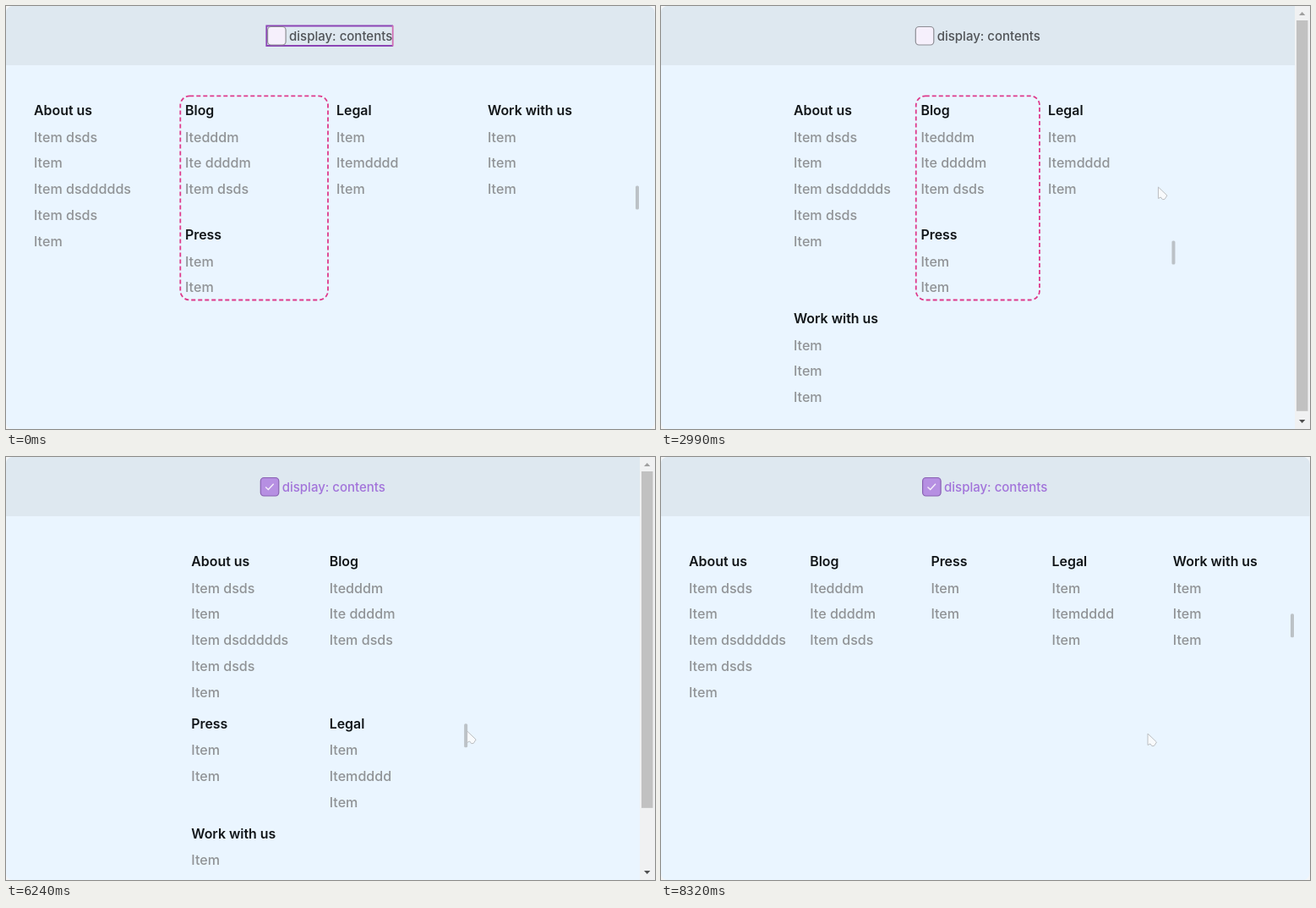
These frames come from a looping animation (768 by 500 pixels, 8.45 s). An HTML page:

```html
<!DOCTYPE html>
<html lang="en">
<head>
<meta charset="utf-8">
<title>display: contents</title>
<style>
  html, body { margin: 0; width: 100%; height: 100%; overflow: hidden; background: #f4f6f8; }
  svg { display: block; width: 768px; height: 500px; }
  text { font-family: Inter, Lato, sans-serif; font-size: 16.1px; font-weight: 500; fill: #909396; }
  .title { font-size: 15.9px; font-weight: 600; fill: #111518; }
  #label { font-size: 15px; fill: #505357; }
  #box { fill: #f6f0fc; stroke: #8d8d94; stroke-width: 1.2; }
  #tick { fill: none; stroke: #f4effa; stroke-width: 1.4; }
  .checked #label { fill: #a273da; }
  .checked #box { fill: #b68fe2; stroke: #8860b2; }
  .pressed #box { fill: #9388b2; stroke: #9388b2; }
  .hover #box { fill: #eef5ff; }
  #outline { fill: none; stroke: #de3a8c; stroke-width: 1.8; stroke-dasharray: 5 3; }
  #pointer { fill: #f8fafc; stroke: #bbbec2; stroke-linejoin: round; }
</style>
</head>
<body>
<svg viewBox="0 0 768 500">
  <clipPath id="round"><rect id="clip" height="500" rx="8"/></clipPath>
  <g clip-path="url(#round)">
    <rect width="768" height="500" fill="#eaf5ff"/>
    <rect width="768" height="70" fill="#dee8f0"/>
  </g>
  <g id="control">
    <g id="ring" fill="none" stroke-width="1.8">
      <path d="M458 23.5H308.3V47H458" stroke="#8b45b5"/>
      <path d="M457.7 23V47.5" stroke="#cf6fb4"/>
    </g>
    <rect id="box" x="309.6" y="24.5" width="21.5" height="21.5" rx="4"/>
    <path id="tick" d="M315.5 35.5l3.2 3 6.3-6.8"/>
    <text id="label" x="335" y="41">display: contents</text>
  </g>
  <g id="groups"></g>
  <rect id="outline" y="106.3" height="241.2" rx="11"/>
  <rect id="handle" width="4" height="28" rx="1.5" fill="#bcc2c7"/>
  <g id="scrollbar">
    <rect x="750" width="18" height="500" fill="#f0f1f2"/>
    <rect id="thumb" x="752" y="17" width="13.5" fill="#c1c1c1"/>
    <path d="M755 11l3.7-4 3.7 4z" fill="#a0a0a0"/>
    <path d="M755 489l3.7 4 3.7-4z" fill="#505050"/>
  </g>
  <g id="pointer">
    <path id="arrow" d="M1 1V14.5L4 13Q5.5 17 8.5 15.5L11.5 11Z"/>
    <path id="hand" d="M-1.5 1.5Q0-1 1.5 1.5V6L8 7.3Q10 8 9.6 10.5L8.5 16H0L-4.3 10.5Q-4.5 8.5-1.5 9.8Z"/>
  </g>
</svg>
<script>
const LOOP = 8450, STEP = 130;
const MIN_PITCH = 136, TOP = 123, PRESS_DY = 147;
const REACH_BOX = 4160, CHECK_AT = 4550;

const $ = id => document.getElementById(id);
const set = (el, attrs) => { for (const k in attrs) el.setAttribute(k, attrs[k]); };
const show = (el, on) => { el.style.display = on ? '' : 'none'; };
const move = (el, x, y) => set(el, { transform: `translate(${x} ${y})` });
const mix = (a, b, p) => a + (b - a) * p;
const ramp = (t, from, to) => Math.min(1, Math.max(0, (t - from) / (to - from)));

const content = [
  ['About us', 'Item dsds', 'Item', 'Item dsddddds', 'Item dsds', 'Item'],
  ['Blog', 'Itedddm', 'Ite ddddm', 'Item dsds'],
  ['Press', 'Item', 'Item'],
  ['Legal', 'Item', 'Itemdddd', 'Item'],
  ['Work with us', 'Item', 'Item', 'Item']
];

function addSvg(parent, tag, attrs = {}, text = '') {
  const el = document.createElementNS('http://www.w3.org/2000/svg', tag);
  set(el, attrs);
  el.textContent = text;
  parent.append(el);
  return el;
}

const groups = content.map(([title, ...items]) => {
  const el = addSvg($('groups'), 'g');
  addSvg(el, 'text', { y: 6, class: 'title' }, title);
  items.forEach((item, i) => addSvg(el, 'text', { y: 37.5 + i * 30.8 }, item));
  return { el, height: 37.5 + 30.85 * items.length };
});
const [about, blog, press, legal, work] = groups;

// The container is dragged narrow, then wide again, each time faster at the end.
function gridWidth(t) {
  const drag = (from, to) => ramp(t, from, to) ** 0.96;
  return 716 - 264.5 * drag(2210, 2990) - 155.5 * drag(2990, 3220)
    + 200 * drag(6110, 7020) + 220 * drag(7020, 7540);
}

// Lays out the groups and returns the x of the resize handle.
function drawGrid(width, checked) {
  const cells = checked ? groups : [about, blog, legal, work];
  const heightOf = g => g === blog && !checked ? PRESS_DY + press.height : g.height;
  const cols = Math.min(cells.length, Math.floor(width / MIN_PITCH));
  const pitch = width / cols;
  const rowHeights = [];
  cells.forEach((g, i) => {
    const r = Math.floor(i / cols);
    rowHeights[r] = Math.max(rowHeights[r] || 0, heightOf(g));
  });
  const total = rowHeights.reduce((a, b) => a + b, 0);
  const scrolls = total > 350;
  const left = (scrolls ? 382.7 : 391) - width / 2;
  const handleX = left + width - 4;

  let y = TOP;
  cells.forEach((g, i) => {
    if (i && i % cols === 0) y += rowHeights[i / cols - 1];
    move(g.el, left + (i % cols) * pitch, y);
  });
  if (!checked) move(press.el, left + pitch, TOP + PRESS_DY);
  show($('outline'), !checked);
  set($('outline'), { x: left + pitch - 5.7, width: pitch - 4.3 });
  set($('handle'), { x: handleX, y: 89.4 + total / 2 });

  show($('scrollbar'), scrolls);
  set($('thumb'), { height: 466 * 466 / (total + 94) });
  set($('clip'), { width: scrolls ? 790 : 767.5 });
  move($('control'), scrolls ? -8.3 : 0, 0);
  return handleX;
}

// The pointer drags the handle, visits the checkbox, drags again and leaves.
function pointerAt(t, handleX) {
  if (t < CHECK_AT) {
    const toBox = ramp(t, 3640, REACH_BOX);
    const x = handleX - 17 * ramp(t, 2210, 2340);
    const y = 226 - 13 * ramp(t, 2340, 2990);
    return [mix(x, 318, toBox), mix(y, 44, toBox)];
  }
  const back = ramp(t, CHECK_AT, 5135);
  const leave = ramp(t, 8060, 8320);
  const x = mix(318, handleX + 10 * ramp(t, 6110, 6630), back);
  const y = mix(44, 332, ramp(t, CHECK_AT, 5070)) - 9 * ramp(t, 5070, 5330);
  return [mix(x, 575, leave), mix(y, 326, leave)];
}

function draw(time) {
  const t = Math.floor((time % LOOP) / STEP) * STEP;
  const checked = t >= CHECK_AT;
  const overBox = t >= REACH_BOX && t <= CHECK_AT;
  const handleX = drawGrid(gridWidth(t), checked);

  const control = $('control').classList;
  control.toggle('checked', checked);
  control.toggle('pressed', checked && t < 5330);
  control.toggle('hover', overBox && !checked);
  show($('tick'), checked);
  show($('ring'), t < STEP);

  show($('pointer'), t >= 1820);
  show($('arrow'), !overBox);
  show($('hand'), overBox);
  move($('pointer'), ...pointerAt(t, handleX));
}

const start = performance.now();
function tick() {
  draw(performance.now() - start);
  requestAnimationFrame(tick);
}
tick();
</script>
</body>
</html>
```
